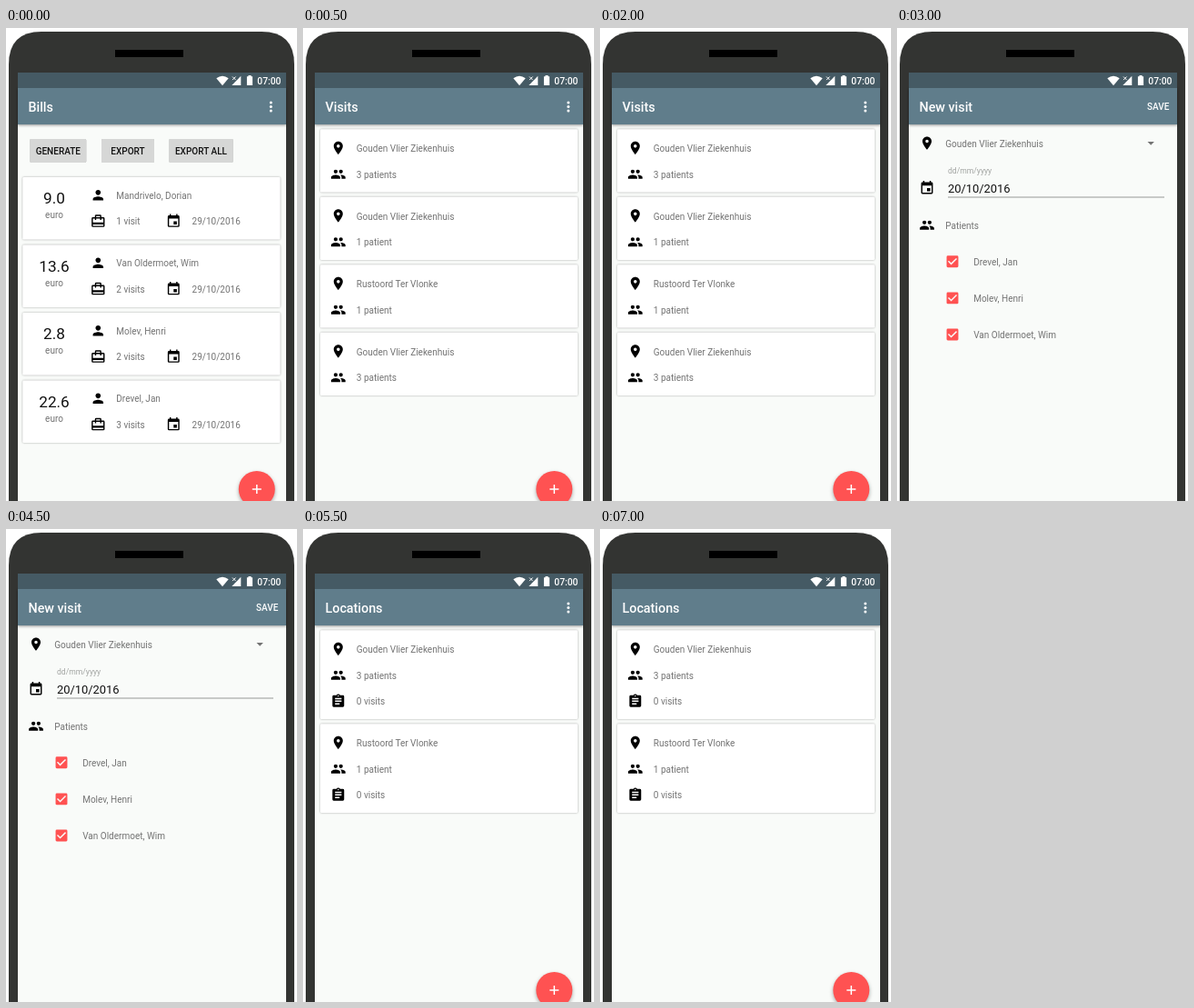
Recreate the animation shown at these times as an HTML page. Size 320 by 520 pixels, loop 8000 ms.

```html
<!DOCTYPE html>
<html lang="en">
<head>
<meta charset="utf-8">
<title>Visits app</title>
<style>
  html, body { margin: 0; width: 100%; height: 100%; overflow: hidden; background: #fff; }
  svg { display: block; font: 10px Roboto, sans-serif; fill: #737373; }
  .medium { font-weight: 500; }
  .card { fill: #fff; filter: drop-shadow(0 .8px .8px #0005); }
  .button { fill: #d6d7d6; filter: drop-shadow(0 .8px .7px #0004); }
  .bar { filter: drop-shadow(0 1px 1.5px #0006); }
  .fab { fill: #ff5252; filter: drop-shadow(0 2px 2px #0005); }
</style>
</head>
<body>
<svg width="320" height="520" viewBox="0 0 320 520">
  <path d="M3 520V40Q3 4 39 4H281Q317 4 317 40V520Z" fill="#333432"/>
  <path d="M120 24h75v8h-75z" fill="#000"/>
  <path d="M13 49h295v471H13z" fill="#f9fbf9"/>
  <path class="bar" d="M13 66h295v40H13z" fill="#607d8b"/>
  <path d="M13 49h295v17H13z" fill="#455a64"/>
  <g fill="#fff">
    <path d="M231.3 55.3Q238 50.2 244.7 55.3L238 63.2Z"/>
    <path d="M258.3 52.8V63H248.3Z"/>
    <path d="M249 53.5l3.6 3.6m0-3.6l-3.6 3.6" stroke="#fff"/>
    <path d="M266.5 52h3v1.2h1.6v9.8h-6.2v-9.8h1.6z"/>
    <text class="medium" x="276.3" y="61.6" font-size="10.3">07:00</text>
  </g>
  <g id="screen"></g>
</svg>
<script>
const icons = {
  person: 'M12 12c2.21 0 4-1.79 4-4s-1.79-4-4-4-4 1.79-4 4 1.79 4 4 4zm0 2c-2.67 0-8 1.34-8 4v2h16v-2c0-2.66-5.33-4-8-4z',
  place: 'M12 2C8.13 2 5 5.13 5 9c0 5.25 7 13 7 13s7-7.75 7-13c0-3.87-3.13-7-7-7zm0 9.5a2.5 2.5 0 0 1 0-5 2.5 2.5 0 0 1 0 5z',
  group: 'M16 11a3 3 0 0 0 0-6 3 3 0 0 0 0 6zm-8 0a3 3 0 0 0 0-6 3 3 0 0 0 0 6zm0 2c-2.33 0-7 1.17-7 3.5V19h14v-2.5c0-2.33-4.67-3.5-7-3.5zm8 0c-.29 0-.62.02-.97.05 1.16.84 1.97 1.97 1.97 3.45V19h6v-2.5c0-2.33-4.67-3.5-7-3.5z',
  event: 'M17 12h-5v5h5v-5zM16 1v2H8V1H6v2H5a2 2 0 0 0-2 2v14a2 2 0 0 0 2 2h14a2 2 0 0 0 2-2V5a2 2 0 0 0-2-2h-1V1h-2zm3 18H5V8h14v11z',
  tasks: 'M19 3h-4.18a3 3 0 0 0-5.64 0H5a2 2 0 0 0-2 2v14a2 2 0 0 0 2 2h14a2 2 0 0 0 2-2V5a2 2 0 0 0-2-2zm-7 0a1 1 0 0 1 0 2 1 1 0 0 1 0-2zm2 14H7v-2h7v2zm3-4H7v-2h10v2zm0-4H7V7h10v2z',
  bag: 'M20 6h-3V4a2 2 0 0 0-2-2H9a2 2 0 0 0-2 2v2H4a2 2 0 0 0-2 2v11a2 2 0 0 0 2 2h16a2 2 0 0 0 2-2V8a2 2 0 0 0-2-2zM9 4h6v2H9V4zm11 15H4v-2h16v2zm0-5H4V8h3v2h2V8h6v2h2V8h3v6z',
  check: 'M19 3H5a2 2 0 0 0-2 2v14a2 2 0 0 0 2 2h14a2 2 0 0 0 2-2V5a2 2 0 0 0-2-2zm-9 14l-5-5 1.41-1.41L10 14.17l7.59-7.59L19 8l-9 9z'
};
const hospital = 'Gouden Vlier Ziekenhuis', home = 'Rustoord Ter Vlonke';
const [dorian, wim, henri, jan] =
  ['Mandrivelo, Dorian', 'Van Oldermoet, Wim', 'Molev, Henri', 'Drevel, Jan'];

const text = (x, y, s, attrs = '') => `<text x="${x}" y="${y}" ${attrs}>${s}</text>`;
const rect = (x, y, w, h, cls) => `<rect class="${cls}" x="${x}" y="${y}" width="${w}" height="${h}" rx="1.4"/>`;
const icon = (name, x, y, fill = '#000') =>
  `<path d="${icons[name]}" fill="${fill}" transform="translate(${x} ${y}) scale(.717) translate(-12 -12)"/>`;
const row = (name, x, y, s, gap, fill) => icon(name, x, y, fill) + text(x + gap, y + 4, s);
const title = s => text(24.5, 92, s, 'class="medium" font-size="14.3" fill="#fff"');
const count = (n, noun) => `${n} ${noun}${n === 1 ? '' : 's'}`;

// Overflow menu and floating add button, shared by the list screens
const controls = x => [82, 86.5, 91].map(y => `<circle cx="${x + 15.5}" cy="${y}" r="1.5" fill="#fff"/>`).join('') +
  `<circle class="fab" cx="${x}" cy="507" r="20"/>
   <path d="M${x - 5} 507h10m-5-5v10" stroke="#fff" stroke-width="1.5"/>`;

const button = (x, w, s) => rect(x, 122, w, 26, 'button') +
  text(x + w / 2, 138.8, s, 'class="medium" fill="#111" text-anchor="middle"');

const bill = ([amount, name, visits], i) => {
  const y = 164 + i * 74.5;
  return rect(18.3, y, 283.2, 68.6, 'card') +
    text(53, y + 29.3, amount, 'font-size="17.2" fill="#111" text-anchor="middle"') +
    text(53, y + 45, 'euro', 'text-anchor="middle"') +
    row('person', 101.3, y + 19.7, name, 20) +
    row('bag', 101.3, y + 48.4, count(visits, 'visit'), 20) +
    row('event', 184.3, y + 48.4, '29/10/2016', 20.3);
};

const place = height => ([name, patients, visits], i) => {
  const y = 111.3 + i * (height + 5.2);
  return rect(19, y, 283, height, 'card') +
    row('place', 38.8, y + 20.7, name, 20) +
    row('group', 38.8, y + 49.4, count(patients, 'patient'), 20) +
    (visits === undefined ? '' : row('tasks', 38.8, y + 78, count(visits, 'visit'), 20));
};

const bills = title('Bills') + controls(275.8) +
  button(26.3, 62, 'GENERATE') + button(105, 58, 'EXPORT') + button(179.3, 70.4, 'EXPORT ALL') +
  [['9.0', dorian, 1], ['13.6', wim, 2], ['2.8', henri, 2], ['22.6', jan, 3]].map(bill).join('');

const visits = title('Visits') + controls(276.3) +
  [[hospital, 3], [hospital, 1], [home, 1], [hospital, 3]].map(place(69.3)).join('');

const newVisit = title('New visit') +
  text(299.5, 90.2, 'SAVE', 'class="medium" fill="#fff" text-anchor="end"') +
  row('place', 33, 126.7, hospital, 20.3) +
  '<path d="M275.5 125h7.4l-3.7 3.7z"/>' +
  text(56, 160, 'dd/mm/yyyy', 'font-size="8.6" fill="#a3a5a3"') +
  icon('event', 33, 176) +
  text(56, 180.7, '20/10/2016', 'font-size="12.9" fill="#111"') +
  '<path d="M56 186h238" stroke="#8b8d8b" stroke-width=".9"/>' +
  row('group', 33, 216.7, 'Patients', 20.3) +
  [jan, henri, wim].map((name, i) => row('check', 61, 256.8 + i * 40.1, name, 23.2, '#ff5252')).join('');

const locations = title('Locations') + controls(276.3) +
  [[hospital, 3, 0], [home, 1, 0]].map(place(97.8)).join('');

const screens = [[0, bills], [500, visits], [3000, newVisit], [5500, locations]];
const stage = document.getElementById('screen');
let shown;

function draw() {
  const time = performance.now() % 8000;
  const current = screens.findLast(([start]) => time >= start)[1];
  if (current !== shown) stage.innerHTML = shown = current;
  requestAnimationFrame(draw);
}
draw();
</script>
</body>
</html>
```
